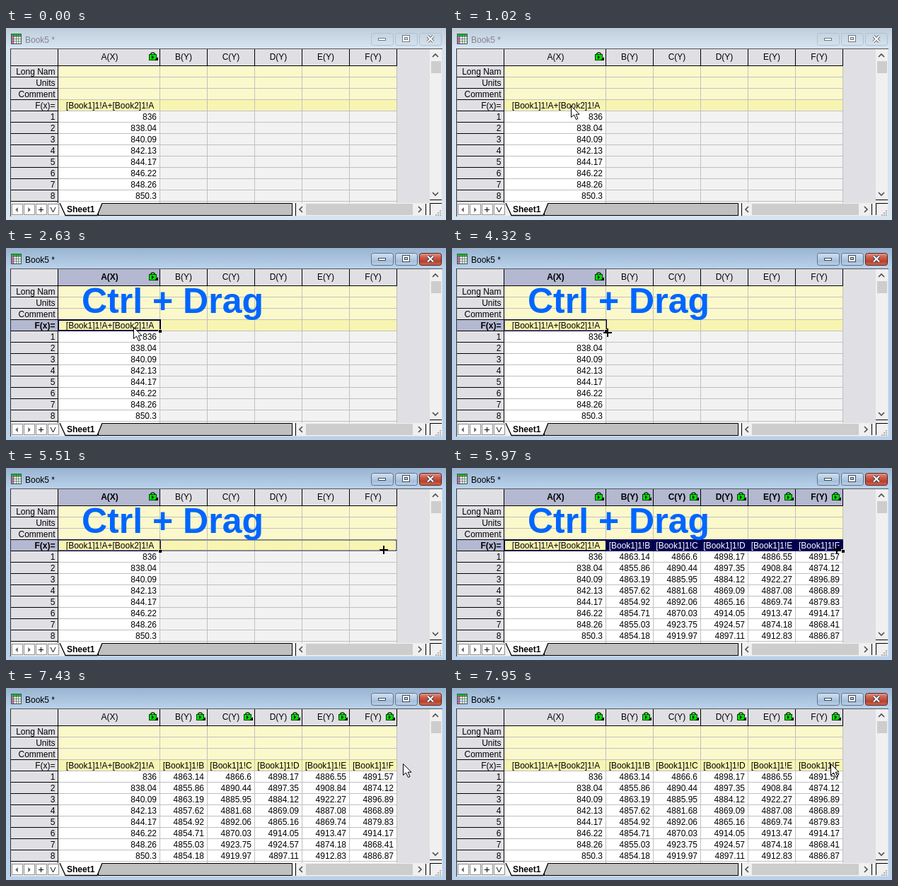
Write an HTML page with a canvas that moves like this. It is 622 px wide and 272 px high and loops after 8 s.

```html
<!DOCTYPE html>
<html lang="en">
<head>
<meta charset="utf-8">
<title>Fill formula across columns</title>
<style>
html, body { margin: 0; width: 100%; height: 100%; overflow: hidden; }
canvas { display: block; }
</style>
</head>
<body>
<canvas id="stage" width="622" height="272"></canvas>
<script>
const ctx = document.getElementById('stage').getContext('2d');
const LOOP = 8000;
const STEP = 71;
const FAMILY = '"Liberation Sans", Arial, sans-serif';
const FONT = '12px ' + FAMILY;
const BOLD = 'bold ' + FONT;
const HEADER = '#e0dfe3', CHOSEN = '#b4b8d0', FORMULA = '#f8f5b2', NAVY = '#000040';

// Times at which the sheet changes state
const CLICK = 2030, CROSS = 3080, PRESS = 4320, RELEASE = 5820,
      FILLED = 5970, ARROW = 6890, DESELECT = 7430;

// Pointer moves: start, end, x, y
const MOVES = [
  [380, 1020, 168, 110],
  [2400, 2400, 180, 112],
  [2700, 2770, 231, 117],
  [3020, 3230, 220, 120],
  [4620, 5220, 505, 117],
  [5370, 5510, 544, 115],
  [6890, 7030, 561, 107],
  [7890, 7950, 509, 106]
];

const LETTERS = 'ABCDEF';
const LABELS = ['Long Nam', 'Units', 'Comment', 'F(x)='];
const leftEdge = col => col ? 150 + 67 * col : 73;
const rightEdge = col => 217 + 67 * col;
const middle = col => (leftEdge(col) + rightEdge(col) + 1) / 2 + (col ? 0 : 1);
const rowTop = row => 54 + 16 * row;

function cellValue(col, i) {
  const noise = Math.abs(Math.sin(col * 12.9898 + i * 78.233) * 43758.5453) % 1;
  const value = col === 0 ? 836 + 2.0433 * i
    : col === 1 ? 4853 + 11 * noise
    : 4863 + 63 * noise;
  return String(+value.toFixed(2));
}

function pointerAt(t) {
  let x = 490, y = 270;
  for (const [start, end, toX, toY] of MOVES) {
    if (t < start) break;
    const steps = Math.round((end - start) / STEP) + 1;
    const p = Math.min(1, (Math.floor((t - start) / STEP) + 1) / steps);
    const k = p * p * (3 - 2 * p);
    x += (toX - x) * k;
    y += (toY - y) * k;
  }
  return [Math.round(x), Math.round(y)];
}

function rect(x, y, w, h, color) {
  ctx.fillStyle = color;
  ctx.fillRect(x, y, w, h);
}

function frame(x, y, w, h, color, width = 1, dash = []) {
  ctx.strokeStyle = color;
  ctx.lineWidth = width;
  ctx.setLineDash(dash);
  ctx.strokeRect(x + width / 2, y + width / 2, w - width, h - width);
  ctx.setLineDash([]);
}

function text(s, x, y, align = 'left', color = '#000', font = FONT) {
  ctx.font = font;
  ctx.textAlign = align;
  ctx.fillStyle = color;
  ctx.fillText(s, x, y);
}

function path(points, { fill, stroke, width = 1, close = false }) {
  ctx.beginPath();
  points.forEach(([x, y]) => ctx.lineTo(x, y));
  if (close) ctx.closePath();
  if (fill) { ctx.fillStyle = fill; ctx.fill(); }
  if (stroke) { ctx.strokeStyle = stroke; ctx.lineWidth = width; ctx.stroke(); }
}

// Solid triangle pointing along direction (1 right, -1 left)
function triangle(x, y, direction, size, color) {
  path([[x - size / 2 * direction, y - size], [x - size / 2 * direction, y + size],
        [x + size / 2 * direction, y]], { fill: color });
}

function chevron(x, y, dx, dy) {
  const side = s => [x - 2 * dx + 4 * dy * s, y - 2 * dy + 4 * dx * s];
  path([side(1), [x + 2 * dx, y + 2 * dy], side(-1)], { stroke: '#505050', width: 1.7 });
}

function gradient(y, h, ...colors) {
  const g = ctx.createLinearGradient(0, y, 0, y + h);
  colors.forEach((color, i) => g.addColorStop(i / (colors.length - 1), color));
  return g;
}

function windowButton(i, active) {
  const x = 516 + 34 * i;
  const fill = i === 2 ? gradient(7, 18, '#e2a195', '#cf5f4c', '#b8402a', '#d0705a')
    : gradient(7, 18, '#d3e2f2', '#bdd2e8', '#a5bfdb', '#bfd5ec');
  ctx.beginPath();
  ctx.roundRect(x + 0.5, 7.5, 31, 17, 3);
  if (active) { ctx.fillStyle = fill; ctx.fill(); }
  ctx.lineWidth = 1;
  ctx.strokeStyle = !active ? '#b3c0ce' : i === 2 ? '#5c2018' : '#5f7288';
  ctx.stroke();
}

function titleBar(active) {
  rect(0, 0, 622, 272, active ? gradient(0, 28, '#99b4d1', '#b9d1ea') : gradient(0, 28, '#bfcddb', '#d7e4f2'));

  rect(7, 8, 15, 15, '#3c5a48');
  for (let r = 0; r < 4; r++)
    for (let c = 0; c < 4; c++)
      rect(8 + c * 3.4, 9 + r * 3.4, 2.7, 2.7, r === 0 ? '#22c032' : c ? '#fff' : '#e66ac0');
  text('Book5 *', 27, 21, 'left', active ? '#000' : '#80868e');

  for (let i = 0; i < 3; i++) windowButton(i, active);
  const ink = active ? '#404852' : '#70777f';
  rect(526, 14, 11, 4, ink);
  rect(527, 15, 9, 2, '#fff');
  frame(560, 10, 11, 10, ink);
  frame(561, 11, 9, 8, '#fff', 2);
  frame(563, 13, 5, 4, ink);
  for (const [color, width] of [[ink, 4], ['#fff', 2]]) {
    path([[596, 11.5], [604, 19.5]], { stroke: color, width });
    path([[604, 11.5], [596, 19.5]], { stroke: color, width });
  }
}

function lock(x) {
  ctx.beginPath();
  ctx.arc(x + 5.5, 38, 3, Math.PI, 0);
  ctx.strokeStyle = '#063c06';
  ctx.lineWidth = 1.6;
  ctx.stroke();
  rect(x, 37, 11, 9, '#063c06');
  rect(x + 1, 38, 9, 7, '#00dc00');
  triangle(x + 5.5, 41.5, 1, 2.8, '#000');
  path([[x + 13, 41], [x + 13, 46], [x + 8, 46]], { fill: '#000' });
}

function sheet(selecting, filled) {
  rect(6, 29, 611, 238, HEADER);

  for (let c = 0; c < 6; c++) {
    const left = leftEdge(c) + 1, right = rightEdge(c), w = right - left;
    const chosen = selecting && (c === 0 || filled);
    rect(left, 30, w, 23, chosen ? CHOSEN : HEADER);
    text(LETTERS[c] + (c ? '(Y)' : '(X)'), middle(c), 45, 'center', '#000', chosen ? BOLD : FONT);
    rect(left, 54, w, 48, '#fbf9cb');
    rect(left, 102, w, 16, FORMULA);
    rect(left, 118, w, 130, c === 0 || filled ? '#fff' : '#f2f2f2');
    rect(right, 54, 1, 194, '#c0c0c0');
    rect(right, 30, 1, 24, '#000');
    if (c === 0 || filled) {
      lock(right - 15);
      for (let i = 0; i < 8; i++)
        text(cellValue(c, i), right - 4, rowTop(4 + i) + 12, 'right');
    }
  }

  if (selecting) rect(7, 102, 66, 15, CHOSEN);
  for (let row = 0; row < 12; row++) {
    const bold = selecting && row === 3;
    text(LABELS[row] || row - 3, 69.5, rowTop(row) + 12, 'right', '#000', bold ? BOLD : FONT);
    rect(7, rowTop(row) + 15, 67, 1, '#000');
    rect(74, rowTop(row) + 15, 479, 1, '#c0c0c0');
  }
  rect(6, 53, 547, 1, '#000');
  rect(6, 29, 611, 1, '#555');
  rect(6, 29, 1, 238, '#333');
  rect(73, 30, 1, 218, '#000');
}

function selection(t, active, filled, pointerX) {
  const ranged = t >= RELEASE;
  if (active && ranged) rect(218, 101, 335, 17, '#000050');
  text(`[Book1]1!A+[Book2]1!A`, 147, 114, 'center');
  for (let c = 1; filled && c < 6; c++)
    text('[Book1]1!' + LETTERS[c], middle(c), 114, 'center', active ? '#fff' : '#000');
  if (!active) return;

  frame(73, 101, 146, 17, NAVY, 2);
  if (t >= PRESS && !ranged) {
    frame(74, 102, 144, 15, FORMULA, 1, [1, 1]);
    // The outline takes in a column once the pointer passes its middle
    const reached = Math.floor((pointerX - 183.5) / 67);
    if (reached > 0) frame(217, 101, 67 * reached + 1, 17, '#303068', 2, [1, 1]);
  }
  const corner = ranged ? 552 : 217;
  rect(corner - 2, 115, 5, 5, FORMULA);
  rect(corner - 1, 116, 4, 4, '#000');
}

function scrollBars() {
  rect(599, 30, 17, 218, '#f0f0f0');
  rect(601, 47, 14, 17, '#cdcdcd');
  chevron(607, 39, 0, -1);
  chevron(607, 235, 0, 1);
  rect(599, 243, 17, 1, '#000');

  rect(7, 248, 609, 18, '#f0f0f0');
  rect(424, 249, 151, 16, '#cdcdcd');
  rect(409, 248, 1, 18, '#000');
  rect(593, 249, 1, 16, '#000');
  rect(599, 248, 17, 1, '#000');
  rect(599, 248, 1, 17, '#000');
  chevron(417, 257, -1, 0);
  chevron(585, 257, 1, 0);
  for (let i = 0; i < 3; i++)
    for (let j = 0; j <= i; j++)
      rect(613 - j * 3, 258 + i * 3, 2, 2, '#b0b0b0');
}

function tabs() {
  for (let i = 0; i < 4; i++) {
    rect(8 + i * 17, 249, 16, 16, '#fff');
    frame(8 + i * 17, 249, 16, 16, '#909090');
  }
  triangle(15, 257.5, -1, 3.5, '#606060');
  triangle(33, 257.5, 1, 3.5, '#606060');
  rect(46, 257, 7, 1, '#000');
  rect(49, 254, 1, 7, '#000');
  path([[63, 254], [66.5, 261], [70, 254]], { stroke: '#000' });
  rect(130, 249, 274, 16, '#c0c0c0');
  frame(130, 248, 275, 18, '#000');
  path([[76, 248], [84, 265.5], [129, 265.5], [136, 248]], { fill: '#fff', stroke: '#000', width: 1.3 });
  text('Sheet1', 86, 261, 'left', '#000', BOLD);
}

function pointer(t, x, y) {
  if (t < MOVES[0][0]) return;
  if (t >= CROSS && t < ARROW) {
    rect(x - 6, y - 1, 12, 2, '#000');
    rect(x - 1, y - 6, 2, 12, '#000');
    return;
  }
  const outline = [[0, 0], [0, 16], [4, 12.5], [7, 19], [9.5, 18], [6.7, 11.7], [11.5, 11.7]];
  path(outline.map(([dx, dy]) => [x + dx + 0.5, y + dy + 0.5]), { fill: '#fff', stroke: '#000', close: true });
}

function draw(t) {
  const [x, y] = pointerAt(t);
  const selecting = t >= CLICK && t < DESELECT;
  const filled = t >= FILLED;
  titleBar(t >= CLICK);
  sheet(selecting, filled);
  selection(t, selecting, filled, x);
  scrollBars();
  tabs();
  if (selecting) text('Ctrl + Drag', 107, 92, 'left', '#0066ff', 'bold 50px ' + FAMILY);
  pointer(t, x, y);
}

const begin = performance.now();
function tick() {
  draw((performance.now() - begin) % LOOP);
  requestAnimationFrame(tick);
}
tick();
</script>
</body>
</html>
```
